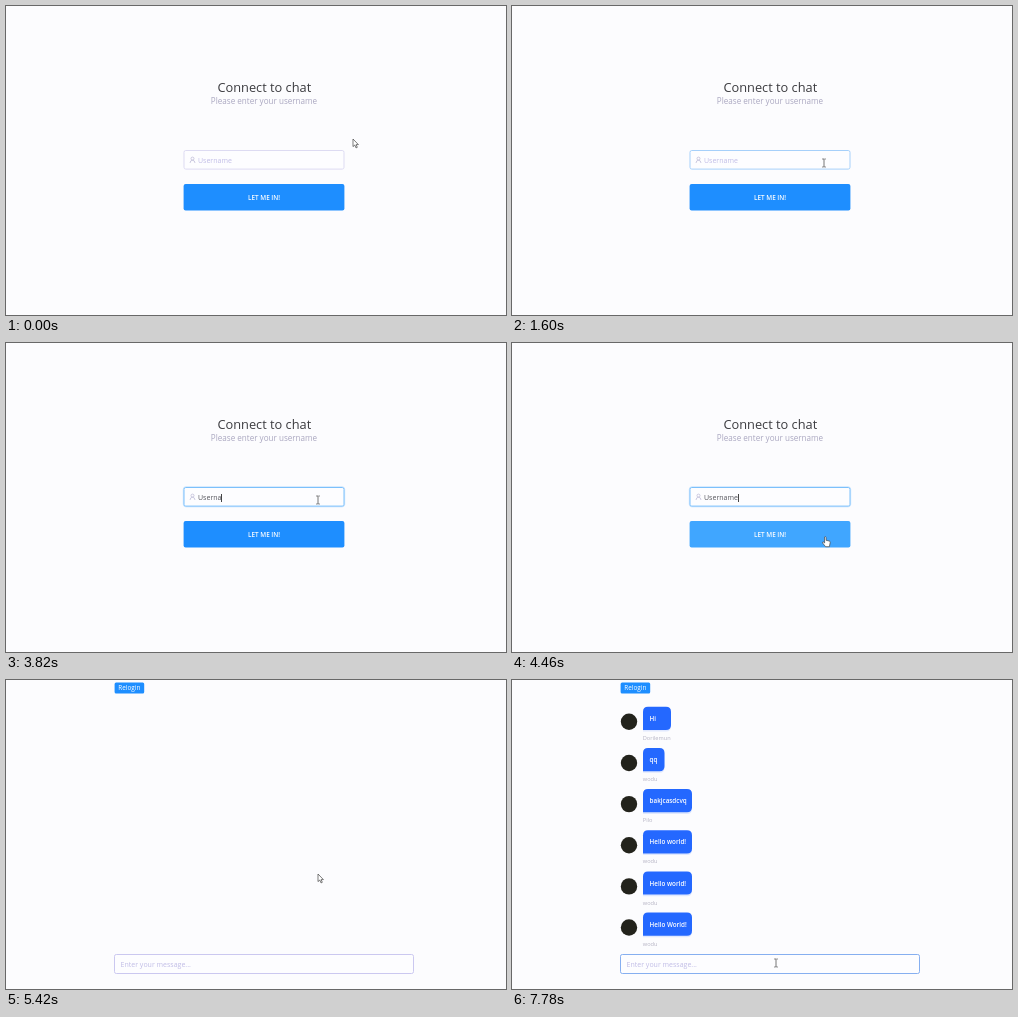
Animation of 500 by 309 pixels, one loop 8 s. Source, as an HTML page:

```html
<!DOCTYPE html>
<html lang="en">
<head>
<meta charset="utf-8">
<title>Chat login</title>
<style>
  html, body { margin: 0; width: 100%; height: 100%; overflow: hidden; background: #fcfcfe; }
  body { font-family: "Open Sans", "Noto Sans", sans-serif; }
  svg, div { position: absolute; }
  svg { left: 0; top: 0; }
  .mid { text-anchor: middle; }
  .hint { font-size: 7px; fill: #c0bce6; }
  .msg { font-size: 6.3px; font-weight: 600; fill: #fff; }
  .who { font-size: 5.6px; fill: #b5b3c4; }

  /* every timeline is 8 s long: 1% = 80 ms */
  .login   { animation: login 8s step-end infinite; }
  .chat    { animation: chat 8s step-end infinite; }
  .loading { animation: loading 8s step-end infinite; }
  .compose { animation: compose 8s step-end infinite; }
  .history { animation: history 8s linear infinite; }
  @keyframes login   { 0% { opacity: 1 } 58%, to { opacity: 0 } }
  @keyframes chat    { 0% { opacity: 0 } 58%, to { opacity: 1 } }
  @keyframes loading { 0% { opacity: 0 } 58% { opacity: 1 } 67.25%, to { opacity: 0 } }
  @keyframes compose { 0% { opacity: 0 } 67.25%, to { opacity: 1 } }
  @keyframes history { 0%, 69.5% { opacity: 0 } 71%, to { opacity: 1 } }

  .field  { fill: #fdfdff; animation: field 8s linear infinite; }
  .glow   { fill: none; stroke: #1890ff; stroke-opacity: .22; animation: glow 8s linear infinite; }
  .button { animation: button 8s linear infinite; }
  .entry  { fill: #fdfdff; animation: entry 8s linear infinite; }
  @keyframes field {
    0%, 15% { stroke: #dddbf2 } 19% { stroke: #a6d0fa }
    22.5% { stroke: #a6d0fa } 26.5%, to { stroke: #7cc0fb }
  }
  @keyframes glow   { 0%, 22.5% { opacity: 0 } 26.5%, to { opacity: 1 } }
  @keyframes button { 0%, 52% { fill: #1e8eff } 55.5%, to { fill: #40a6ff } }
  @keyframes entry {
    0%, 81% { stroke: #cbc8f0 } 84% { stroke: #b4cbf3 }
    88.75% { stroke: #b4cbf3 } 90.5%, to { stroke: #86aff0 }
  }

  .name-hint { animation: name-hint 8s step-end infinite; }
  .typed { left: 192px; top: 149.5px; height: 10px; display: flex; align-items: center;
           line-height: 10px; color: #55555c; }
  .typed span { font-size: 0; animation: key 8s step-end var(--at) infinite; }
  .typed i { width: .7px; height: 8px; background: #444; animation: blink 8s step-end infinite; }
  .msg-caret { animation: msg-caret 8s step-end infinite; }
  @keyframes name-hint { 0% { opacity: 1 } 30.25%, to { opacity: 0 } }
  @keyframes key { 0% { font-size: 7px } 30%, to { font-size: 0 } }
  @keyframes blink { 0% { opacity: 0 } 22.5% { opacity: 1 } 29% { opacity: 0 } 30.25%, to { opacity: 1 } }
  @keyframes msg-caret { 0% { opacity: 0 } 90.5% { opacity: 1 } 97.25%, to { opacity: 0 } }

  .ring { left: 212px; top: 123px; width: 92px; height: 92px; border-radius: 50%;
    background:
      radial-gradient(closest-side, transparent 80.5%, #d4e8ff 81.5%, transparent 83.5%, transparent 95%, #9accff 99%),
      conic-gradient(from 276deg, #1b84fa, #2089ff 30%, #4ba4ff 45%, #61afff 65%, #57aaff 90%, #3f9dff);
    -webkit-mask: radial-gradient(closest-side, transparent 76.5%, #000 78%);
    mask: radial-gradient(closest-side, transparent 76.5%, #000 78%);
    animation: spin 1s linear infinite; }
  @keyframes spin { to { transform: rotate(360deg) } }

  .pointer { animation: move 8s ease-in-out infinite; }
  .arrow { animation: arrow 8s step-end infinite; }
  .beam  { animation: beam 8s step-end infinite; }
  .hand  { animation: hand 8s step-end infinite; }
  @keyframes move {
    0% { transform: translate(347px, 133px) }
    10.25% { transform: translate(345.5px, 134px) }
    19.5%, 47.75% { transform: translate(312px, 157px) }
    55.5%, 69.5% { transform: translate(312px, 194px) }
    84.5%, to { transform: translate(264px, 283px) }
  }
  @keyframes arrow { 0% { opacity: 1 } 15% { opacity: 0 } 49.5% { opacity: 1 } 52% { opacity: 0 } 58% { opacity: 1 } 82%, to { opacity: 0 } }
  @keyframes beam  { 0% { opacity: 0 } 15% { opacity: 1 } 49.5% { opacity: 0 } 82%, to { opacity: 1 } }
  @keyframes hand  { 0% { opacity: 0 } 52% { opacity: 1 } 58%, to { opacity: 0 } }
</style>
</head>
<body>
<svg width="500" height="309">
  <g class="login">
    <text class="mid" x="258.3" y="85.5" font-size="12.8" fill="#3c3c40">Connect to chat</text>
    <text class="mid" x="258" y="97.5" font-size="8.1" fill="#aaa7c0">Please enter your username</text>
    <rect class="glow" x="177.3" y="143.8" width="161.4" height="20" rx="2.5"/>
    <rect class="field" x="178" y="144.5" width="160" height="18.6" rx="1.8"/>
    <g fill="none" stroke="#b9b6d4" stroke-width=".7">
      <circle cx="186.5" cy="152.6" r="1.5"/>
      <path d="M184 157q.3-2.8 2.5-2.8t2.5 2.8"/>
    </g>
    <text class="hint name-hint" x="192" y="157.2">Username</text>
    <rect class="button" x="177.6" y="178" width="160.8" height="26.4" rx="2"/>
    <text class="mid" x="258" y="193.5" font-size="6.4" font-weight="600" fill="#fff">LET ME IN!</text>
  </g>
  <g class="chat">
    <rect x="108.6" y="2.4" width="29.6" height="11.2" rx="1.5" fill="#1e8eff"/>
    <text class="mid" x="123.3" y="10.3" font-size="6.4" fill="#fff">Relogin</text>
    <g class="history" id="history"></g>
    <g class="compose">
      <rect class="entry" x="108.5" y="274.5" width="299" height="19" rx="1.8"/>
      <text class="hint" x="114.6" y="286.7">Enter your message...</text>
      <path class="msg-caret" d="M115 279.5v9" stroke="#444" stroke-width=".7"/>
    </g>
  </g>
</svg>

<div class="login"><div class="typed" id="typed"></div></div>
<div class="loading"><div class="ring"></div></div>

<svg width="500" height="309">
  <g class="pointer" stroke-linejoin="round">
    <path class="arrow" d="M0 0v7.6l1.8-1.6 1.2 2.9 1.3-.6-1.2-2.7h2.3z" fill="#fff" stroke="#444" stroke-width=".7"/>
    <path class="beam" d="M-1.8-4H-.4L0-3.6.4-4H1.8M0-3.6V3.6M-1.8 4H-.4L0 3.6.4 4H1.8" fill="none" stroke="#555" stroke-width=".8"/>
    <path class="hand" d="M.6 0q1-.7 1.5.3v3l3.2.7q1 .3.9 1.5L5.4 9.7H1.6L-1.4 6q-.3-1.3.9-1l1.1.9z" fill="#fff" stroke="#444" stroke-width=".7"/>
  </g>
</svg>

<script>
  const messages = [
    ["Hi", "Dorilemun", 28],
    ["qq", "wodu", 21.5],
    ["bakjcasdcvq", "Pilo", 49],
    ["Hello world!", "wodu", 49],
    ["Hello world!", "wodu", 49],
    ["Hello World!", "wodu", 49]
  ];
  const bubble = (y, w) =>
    `M131 ${y + 23.2}v-18.2q0-5 5-5h${w - 10}q5 0 5 5v13.2q0 5-5 5z`;

  document.getElementById("history").innerHTML = messages.map(([text, who, w], i) => {
    const y = 26.8 + i * 41.15;
    return `<circle cx="117" cy="${y + 15}" r="8.2" fill="#23231c"/>
      <path d="${bubble(y + 1.6, w)}" fill="#2468ff" opacity=".13"/>
      <path d="${bubble(y, w)}" fill="#2468ff"/>
      <text class="msg" x="137.6" y="${y + 14.2}">${text}</text>
      <text class="who" x="130.8" y="${y + 33.2}">${who}</text>`;
  }).join("");

  const keyTimes = [2420, 2640, 2960, 3240, 3580, 3680, 3900, 4000];
  document.getElementById("typed").innerHTML = [..."Username"]
    .map((c, i) => `<span style="--at:${keyTimes[i]}ms">${c}</span>`).join("") + "<i></i>";
</script>
</body>
</html>
```
